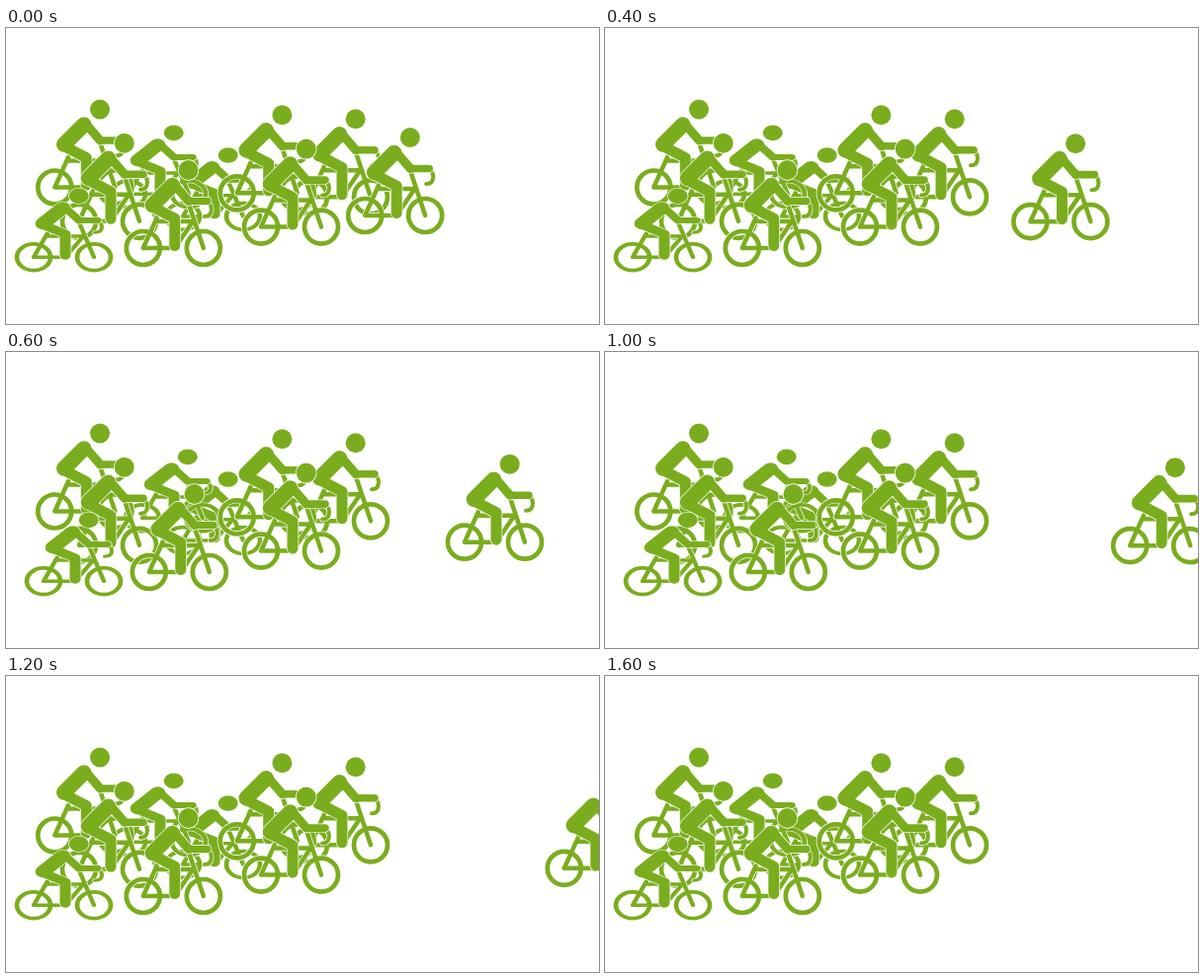
Write an HTML page with a canvas that moves like this. It is 600 px wide and 300 px high and loops after 3600 ms.

```html
<!DOCTYPE html>
<html lang="en">
<head>
<meta charset="utf-8">
<title>Breakaway</title>
<style>
  html, body { margin: 0; width: 100%; height: 100%; overflow: hidden; background: #fff; }
  canvas { display: block; }
</style>
</head>
<body>
<canvas id="stage" width="600" height="300"></canvas>
<script>
const ctx = document.getElementById('stage').getContext('2d');
const GREEN = '#7aad1e';
const STEP = 200, LOOP = 3600, RIDE_STEPS = 8;
const SQUASH = 0.785;

// Rider shapes, relative to the rear hub
const shape = (d, width) => ({ path: new Path2D(d), width });
const wheel = x => shape(`M${x + 17} 0a17 17 0 1 1-34 0a17 17 0 1 1 34 0z`, 4.7);
const bike = [
  wheel(0),
  wheel(61),
  shape('M14-31L0 0H32L51-28M13-27H50M61 0L46-45', 4.5),
  shape('M62-47Q69-46 69-39.5Q69-32 62-32', 4)
];
const body = [
  shape('M29.5-63.5L9.5-43.5', 15.6), // torso
  shape('M10-41.5L32-30V-2.5', 11),   // leg
  shape('M33-62.5L46-47.5', 9),       // upper arm
  shape('M46-47.5H65', 7.6),          // forearm
  shape('M45.7-79h.01', 20)           // head
];

// Back to front; jolt is the sideways kick on odd steps
const pack = [
  { x: 179, y: 191, scaleY: SQUASH },
  { x: 124, y: 168.3, scaleY: SQUASH, jolt: 14 },
  { x: 49.3, y: 161.5 },
  { x: 74, y: 195.8 },
  { x: 308, y: 171.3 },
  { x: 233.7, y: 167.3 },
  { x: 258, y: 201.6 },
  { x: 138.8, y: 223, jolt: 6 },
  { x: 28, y: 232.3, scaleY: SQUASH, jolt: 10 }
];

function strokeAll(shapes, color, extra) {
  ctx.strokeStyle = color;
  for (const { path, width } of shapes) {
    ctx.lineWidth = width + extra;
    ctx.stroke(path);
  }
}

function drawRider(x, y, scaleY = 1) {
  ctx.save();
  ctx.translate(x, y);
  ctx.scale(1, scaleY);
  for (const shapes of [bike, body]) {
    strokeAll(shapes, '#fff', 1.4);
    strokeAll(shapes, GREEN, 0);
  }
  ctx.restore();
}

function draw(now) {
  const step = Math.floor(now % LOOP / STEP);
  const riding = step < RIDE_STEPS;
  const kick = riding ? step % 2 : 0;
  ctx.fillStyle = '#fff';
  ctx.fillRect(0, 0, 600, 300);
  ctx.lineCap = ctx.lineJoin = 'round';
  for (const { x, y, scaleY, jolt = 0 } of pack) drawRider(x + jolt * kick, y, scaleY);
  // The leader pulls away steadily, bouncing a little
  if (riding) drawRider(363.2 + 33.6 * step, 190 + 6.3 * Math.abs(Math.sin(0.9 * step)));
}

let start;
function tick(now) {
  start ??= now;
  draw(now - start);
  requestAnimationFrame(tick);
}
draw(0);
requestAnimationFrame(tick);
</script>
</body>
</html>
```
